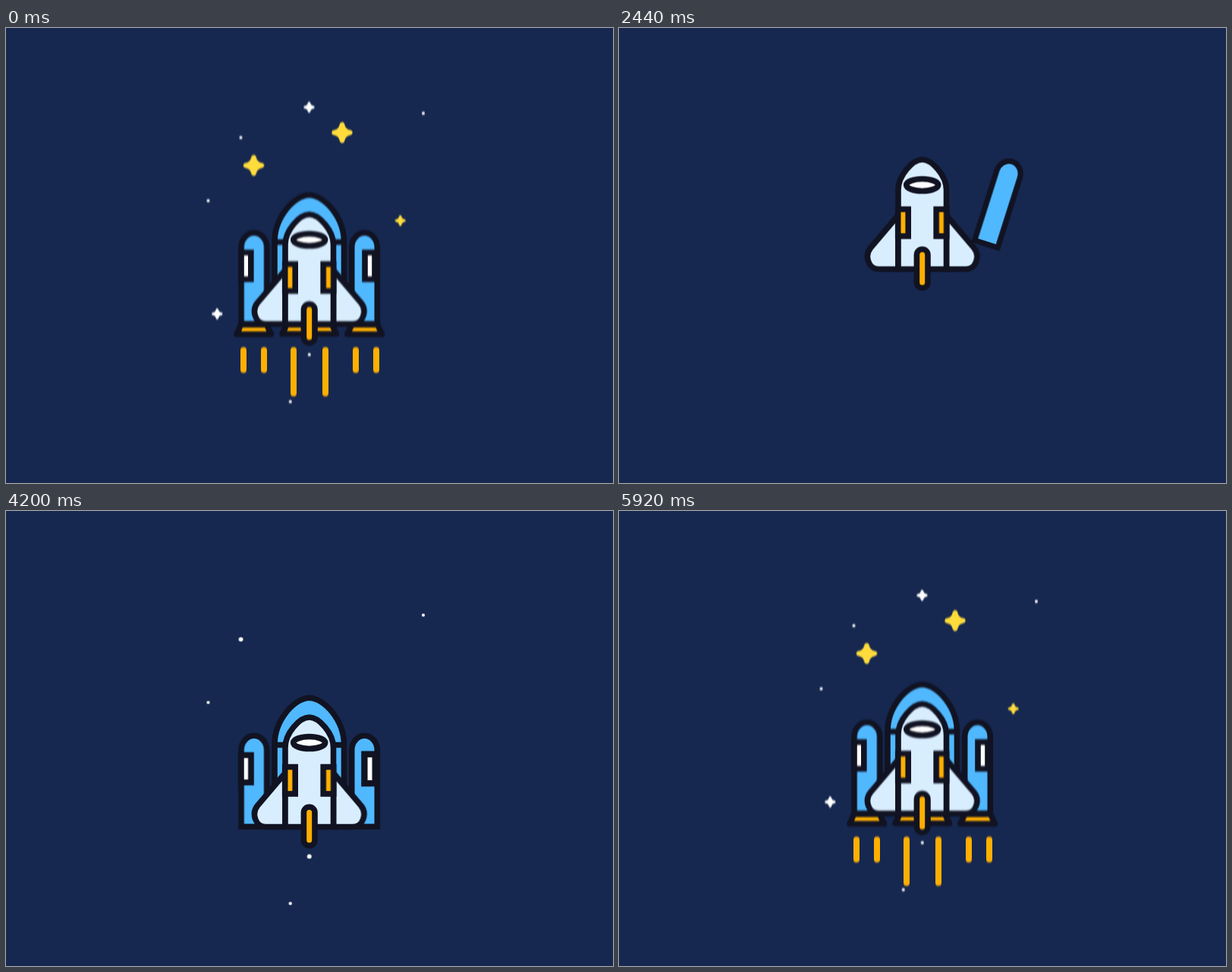
Animation, 800 px wide and 600 px high, one loop 5960 ms. Source, as an HTML page without scripts:

```html
<!DOCTYPE html>
<html lang="en">
<head>
<meta charset="utf-8">
<title>Shuttle launch</title>
<style>
html, body { margin: 0; width: 100%; height: 100%; overflow: hidden; background: #162850; }
svg { display: block; width: 800px; height: 600px; }

/* The cycle is counted from the empty sky, 640 ms after loading. --d shifts a part. */
svg * { animation: none 5960ms calc(var(--d, 0) * 1ms - 5320ms) infinite; }
.part { fill: #d8eeff; stroke: #111322; stroke-width: 7.6; }
.blue { fill: #50b8ff; }
.gold { fill: #ffaf00; }
.white { fill: #fff; }
.round { stroke-linejoin: round; }
.flames { stroke: #ffaf00; stroke-width: 8; stroke-linecap: round; }
.yellow { fill: #ffdc3c; stroke: #ffdc3c; }
.pale { fill: #fff; stroke: #fff; }

.ship .box { transform-box: fill-box; transform-origin: center; }
.ship .top { transform-origin: top; }
.ship .base { transform-origin: bottom; }

.ship { animation-name: ship; }
.sky { animation-name: sky; }
.mid { animation-name: mid; }
.late { animation-name: late; }
.pop { animation-name: pop; }
.slide { animation-name: slide; }
.grow { animation-name: grow; }
.body { animation-name: body; }
.pane { animation-name: pane; }
.tail { animation-name: tail; }
.pocket { animation-name: pocket; }
.wing { animation-name: wing; }
.booster { animation-name: booster; }
.tank { animation-name: tank; }

@keyframes ship {
  0%, 37.58% { transform: translateY(-98.5px); animation-timing-function: ease-in-out; }
  48.66% { transform: translateY(-80.5px); }
  50.34% { transform: translateY(-80.5px); animation-timing-function: cubic-bezier(.6, 0, .3, 1); }
  59.73% { transform: none; }
  83.89% { transform: translateY(0); animation-timing-function: cubic-bezier(.333, 0, .667, 0); }
  100% { transform: translateY(-701px); }
}
@keyframes sky {
  0%, 48.6% { transform: translateY(-700px); animation-timing-function: step-end; }
  48.66% { transform: translateY(0); }
  82.55% { transform: translateY(0); animation-timing-function: cubic-bezier(.333, 0, .667, 0); }
  89.26% { transform: translateY(-24.6px); animation-timing-function: cubic-bezier(.333, .15, .667, .45); }
  94.63% { transform: translateY(-154.6px); animation-timing-function: cubic-bezier(.333, .19, .667, .55); }
  100% { transform: translateY(-530px); }
}
@keyframes mid {
  0%, 20% { visibility: hidden; }
  20.01%, 100% { visibility: visible; }
}
@keyframes late {
  0%, 48% { visibility: hidden; }
  48.01%, 100% { visibility: visible; }
}
@keyframes pop {
  0%, 50.01%, 100% { transform: scale(0); }
  3% { transform: scale(var(--o, 1.2)); }
  6%, 50% { transform: scale(1); }
}
@keyframes slide {
  0%, 50.01%, 100% { transform: translateY(-17px) scaleX(.7); animation-timing-function: ease-in-out; }
  5%, 50% { transform: translateY(0) scaleX(1); }
}
@keyframes grow {
  0%, 50.01%, 100% { transform: scaleY(0); }
  4% { transform: scaleY(1.08); }
  6%, 50% { transform: scaleY(1); }
}
@keyframes body {
  0% { transform: scale(0); }
  3.36% { transform: translateY(0) scale(1.01, .98); }
  6.04% { transform: translateY(-2px) scale(.97, 1); }
  8.72%, 100% { transform: translateY(0) scale(1); }
}
@keyframes pane {
  0%, 3.36% { transform: scale(0); }
  6.04% { transform: translateY(-2.5px) scale(1.1); }
  8.39%, 100% { transform: translateY(0) scale(1); }
}
@keyframes tail {
  0%, 2.68% { transform: translateY(40.5px) scale(0); }
  5.7%, 19.13% { transform: translateY(40.5px) scale(1); }
  23.15% { transform: translateY(-4px) scale(1); }
  25.17%, 100% { transform: translateY(0) scale(1); }
}
@keyframes pocket {
  0%, 10.74% { transform: translateY(-28px) scale(0); }
  13.42% { transform: translateY(-28px) scale(1); }
  16.11% { transform: translateY(4px) scale(1); }
  18.12%, 100% { transform: translateY(0) scale(1); }
}
@keyframes wing {
  0%, 20.46% { transform: translateX(46px) scale(0); animation-timing-function: step-end; }
  20.47% { transform: translateX(46px) scale(1); animation-timing-function: ease-out; }
  25.17%, 100% { transform: translateX(0) scale(1); }
}
@keyframes booster {
  0%, 27.52% { transform: translate(-30px, -8px) rotate(0deg) scale(0); animation-timing-function: ease-out; }
  30.2% { transform: translate(28.5px, -27.3px) rotate(17.6deg) scale(.95); animation-timing-function: ease-out; }
  33.56% { transform: translate(48px, -29px) rotate(18deg) scale(1); animation-timing-function: linear; }
  40.27% { transform: translate(45px, -28px) rotate(17deg) scale(1); animation-timing-function: ease-in-out; }
  46.98%, 100% { transform: translate(0, 0) rotate(0deg) scale(1); }
}
@keyframes tank {
  0%, 41.6% { transform: scale(0); animation-timing-function: step-end; }
  41.61% { transform: scale(.3); }
  46.31% { transform: scale(1.03); }
  49.33%, 100% { transform: scale(1); }
}
</style>
</head>
<body>
<svg viewBox="0 0 800 600" xmlns="http://www.w3.org/2000/svg">
  <defs>
    <path id="star" stroke-width="6.5" stroke-linejoin="round" d="M0-10.5Q1.5-1.5 10.5 0Q1.5 1.5 0 10.5Q-1.5 1.5-10.5 0Q-1.5-1.5 0-10.5Z"/>
    <circle id="dot" r="2.1" fill="#fff"/>
    <path id="booster" class="part blue" d="M455.7 416.3V315C455.7 304 464 296.3 472.5 296.3S489.3 304 489.3 315V416.3Z"/>
    <path id="wing" class="part round" d="M368 345.5L331.5 388.5C323 399 329 416.5 342 416.5H368Z"/>
    <path id="nozzle" class="part gold round" d="M309.7 417.5H343.5L349.5 430H304Z"/>
    <rect id="pocket" class="part gold" x="367.7" y="337.5" width="13.5" height="35.5"/>
    <filter id="skyBlur" filterUnits="userSpaceOnUse" x="0" y="-60" width="800" height="720" color-interpolation-filters="sRGB">
      <feGaussianBlur stdDeviation="0 0">
        <animate attributeName="stdDeviation" begin="-5.32s" dur="5.96s" repeatCount="indefinite"
          keyTimes="0;.826;.893;.946;1" values="0 0;0 0;0 1;0 3.8;0 8"/>
      </feGaussianBlur>
    </filter>
    <filter id="shipBlur" filterUnits="userSpaceOnUse" x="0" y="-60" width="800" height="720" color-interpolation-filters="sRGB">
      <feGaussianBlur stdDeviation="0 0">
        <animate attributeName="stdDeviation" begin="-5.32s" dur="5.96s" repeatCount="indefinite"
          keyTimes="0;.839;.893;.946;1" values="0 0;0 0;0 1.3;0 5.6;0 12"/>
      </feGaussianBlur>
    </filter>
  </defs>

  <rect width="800" height="600" fill="#162850"/>

  <g filter="url(#skyBlur)">
    <g class="sky">
      <g transform="translate(266.5 252.5)"><use href="#dot" class="pop" style="--d:3100;--o:1.6"/></g>
      <g transform="translate(550 137.3)"><use href="#dot" class="pop" style="--d:3180;--o:1.6"/></g>
      <g transform="translate(374.7 517.5)"><use href="#dot" class="pop" style="--d:3260;--o:1.6"/></g>
      <g transform="translate(309.5 169.3)"><use href="#dot" class="pop" style="--d:3340;--o:1.6"/></g>
      <g transform="translate(399.7 455.5)"><use href="#dot" class="pop" style="--d:3460;--o:1.6"/></g>
      <g class="pale" transform="translate(399.5 129.3) scale(.52)"><use href="#star" class="pop" style="--d:3600;--o:1.3"/></g>
      <g class="pale" transform="translate(278.3 401.8) scale(.52)"><use href="#star" class="pop" style="--d:3680;--o:1.3"/></g>
      <g class="yellow" transform="translate(519.7 278.8) scale(.51)"><use href="#star" class="pop" style="--d:3800;--o:1.4"/></g>
      <g class="yellow" transform="translate(443 162.7)"><use href="#star" class="pop" style="--d:3970;--o:1.17"/></g>
      <g class="yellow" transform="translate(326.5 206)"><use href="#star" class="pop" style="--d:4260;--o:1.17"/></g>
    </g>
  </g>

  <g filter="url(#shipBlur)">
    <g class="ship">
      <g class="late">
        <path class="flames box top grow" style="--d:4260" d="M313 451V477M340 451V477M379 451V508M421 451V508M461 451V477M488 451V477"/>
        <use href="#nozzle" class="box slide" style="--d:3880"/>
        <g transform="translate(799.4 0) scale(-1 1)"><use href="#nozzle" class="box slide" style="--d:3880"/></g>
        <path class="part gold round box slide" style="--d:3600" d="M370 417.5H429.5L435.5 429.5H364Z"/>
      </g>
      <g class="mid">
        <use href="#booster" class="box booster"/>
        <g transform="translate(799.4 0) scale(-1 1)"><use href="#booster" class="box booster" style="--d:160"/></g>
      </g>
      <path class="part blue box base tank" d="M354 416V308C354 276 380 246.5 399.7 246.5S445.5 276 445.5 308V416Z"/>
      <g class="late">
        <path class="part box pop" style="--d:3100;--o:1" stroke-width="6" d="M354 308.5H445.5"/>
        <rect class="part white box pop" style="--d:3300;--o:1.1" x="310" y="322.3" width="12.8" height="35.2"/>
        <rect class="part white box pop" style="--d:3400;--o:1.1" x="473" y="322.3" width="13" height="35.2"/>
      </g>
      <use href="#wing" class="wing"/>
      <g transform="translate(799.4 0) scale(-1 1)"><use href="#wing" class="wing"/></g>
      <path class="part box body" d="M368 416.5V312C368 293 387 272 399.7 272S431.5 293 431.5 312V416.5Z"/>
      <ellipse class="part white box pane" cx="399.7" cy="305.5" rx="21" ry="8"/>
      <use href="#pocket" class="box pocket"/>
      <g transform="translate(799.4 0) scale(-1 1)"><use href="#pocket" class="box pocket"/></g>
      <rect class="part gold box tail" x="392.4" y="390.2" width="14.6" height="51" rx="7.3"/>
    </g>
  </g>
</svg>
</body>
</html>
```
